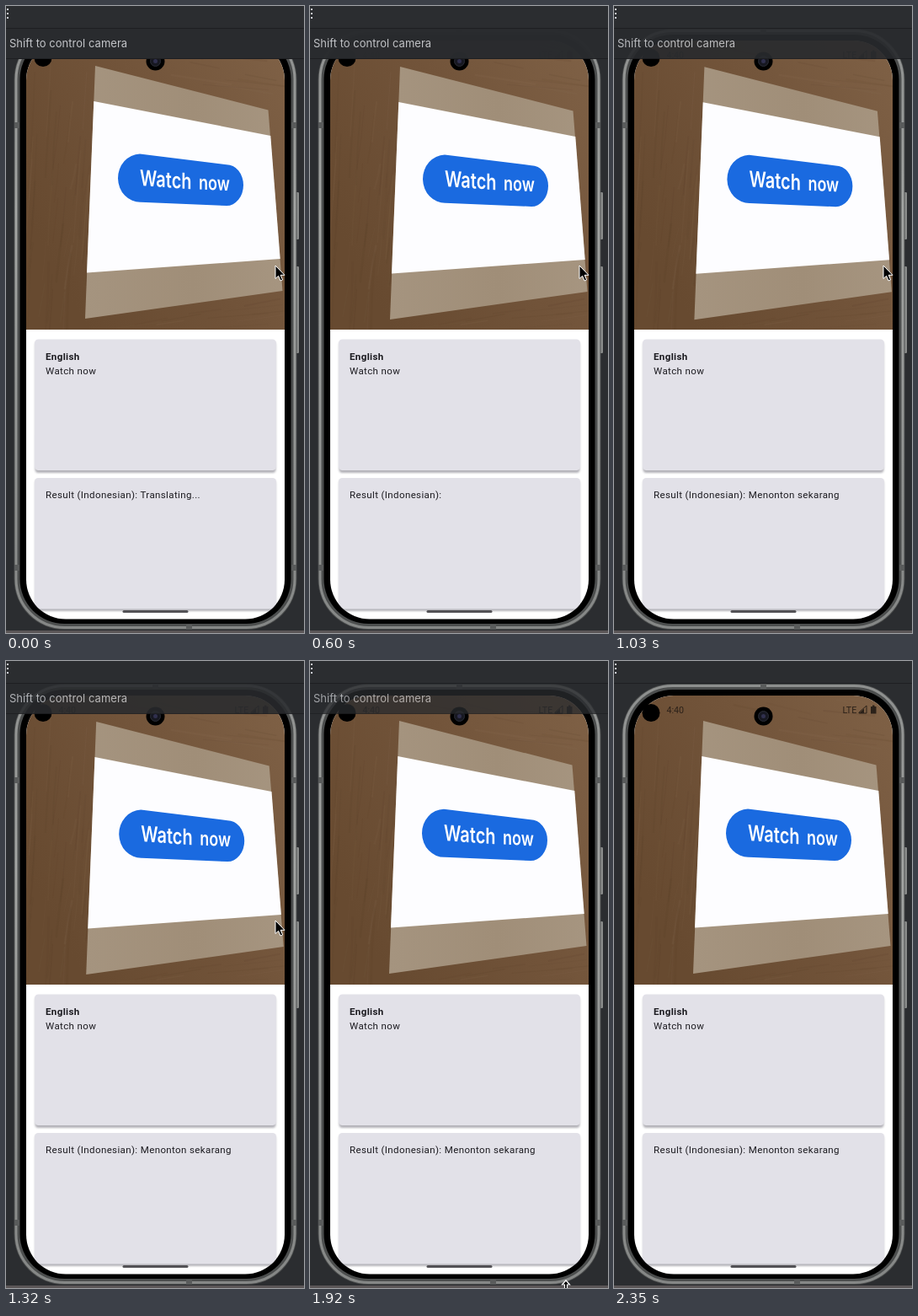
An HTML page for the animation above (2370 ms loop, 354x744 px).

```html
<!DOCTYPE html>
<html lang="en">
<head>
<meta charset="utf-8">
<title>Camera translation</title>
<style>
  html, body { margin: 0; width: 100%; height: 100%; overflow: hidden; background: #2b2d30; }
  svg { display: block; width: 100vw; height: 100vh; }
  .ui { font: 11.56px Roboto, sans-serif; letter-spacing: .36px; fill: #1c1b20; }
  .bold { font-weight: 700; }
  .status { font: 10.7px Roboto, sans-serif; fill: #2b2119; }
  .pill { font-family: Inter, sans-serif; font-weight: 600; fill: #fff; }
  .hint { font: 13px Inter, sans-serif; letter-spacing: .03px; fill: #c3c5c9; }
</style>
</head>
<body>
<svg viewBox="0 0 354 744" preserveAspectRatio="none">
  <defs>
    <linearGradient id="wood" x1="0" y1=".6" x2="1" y2="0">
      <stop offset="0" stop-color="#674a30"/>
      <stop offset=".5" stop-color="#72543a"/>
      <stop offset="1" stop-color="#7f6146"/>
    </linearGradient>
    <linearGradient id="metal" x1="0" y1="0" x2="0" y2="1">
      <stop offset="0" stop-color="#8d8f8e"/>
      <stop offset=".3" stop-color="#a3a5a3"/>
      <stop offset="1" stop-color="#858786"/>
    </linearGradient>
    <linearGradient id="paper" x1="0" y1="0" x2="1" y2="0">
      <stop offset="0" stop-color="#a5947f"/>
      <stop offset=".55" stop-color="#a08e78"/>
      <stop offset="1" stop-color="#a69580"/>
    </linearGradient>
    <filter id="blur" x="-10%" y="-10%" width="120%" height="120%"><feGaussianBlur stdDeviation="1.2"/></filter>
    <clipPath id="screen"><rect x="24" y="41" width="307" height="686.5" rx="47"/></clipPath>
    <clipPath id="view"><rect x="24" y="41" width="307" height="343"/></clipPath>
  </defs>

  <rect width="354" height="744" fill="#2b2d30"/>
  <rect y="26" width="354" height="1" fill="#1e1f22"/>
  <g fill="#ced0d6">
    <rect x="1" y="3" width="2" height="2"/>
    <rect x="1" y="8" width="2" height="2"/>
    <rect x="1" y="13" width="2" height="2"/>
  </g>
  <rect y="741" width="354" height="3" fill="#5b5657"/>

  <g id="phone">
    <g fill="#8b8d8c">
      <rect x="344" y="221" width="4" height="56" rx="1.2"/>
      <rect x="344" y="309" width="4" height="103" rx="1.2"/>
    </g>
    <rect x="9.5" y="27" width="336" height="713" rx="60" fill="#4c4e4e"/>
    <rect x="12" y="29.5" width="331" height="708" rx="57.5" fill="#4c4e4e" stroke="url(#metal)" stroke-width="3"/>
    <rect x="16.500" y="34" width="322" height="699" rx="53"/>
    <g fill="#5a5c5c">
      <rect x="10" y="138" width="6" height="7"/>
      <rect x="339" y="138" width="6" height="7"/>
      <rect x="10" y="663" width="6" height="7"/>
      <rect x="339" y="663" width="6" height="7"/>
      <rect x="174" y="27" width="7" height="6"/>
      <rect x="214" y="734" width="7" height="6"/>
    </g>

    <g clip-path="url(#screen)">
      <rect x="24" y="41" width="307" height="687" fill="#fff"/>
      <g clip-path="url(#view)">
        <rect x="24" y="41" width="307" height="344" fill="url(#wood)"/>
        <g id="grain" fill="none"></g>
        <g id="sheet">
          <path d="M106 71L311.5 123.5L328.5 338L94 371Z" fill="url(#paper)"/>
          <path d="M104.3 113L314.3 154L325.7 300L96 316.5Z" fill="#fdfdff"/>
          <path d="M159 175.6L262 188.2A20 24.4 0 0 1 262 237L160 232.800A26.500 28.600 0 0 1 159 175.600Z" fill="#1a6ae0"/>
          <text class="pill" font-size="20" transform="matrix(1 .07 0 1.3 159 213)">Watch</text>
          <text class="pill" font-size="18" transform="matrix(1 .05 0 1.3 229 217.500)">now</text>
        </g>
      </g>

      <g fill="#8c8b94" opacity=".65" filter="url(#blur)">
        <rect x="34.500" y="398" width="286" height="156" rx="4"/>
        <rect x="34.500" y="562" width="286" height="156" rx="4"/>
      </g>
      <g fill="#e2e1e8">
        <rect x="34" y="395.500" width="287" height="155.500" rx="4.500"/>
        <rect x="34" y="560" width="287" height="155.500" rx="4.500"/>
      </g>
      <text class="ui bold" x="47" y="420">English</text>
      <text class="ui" x="47" y="437">Watch now</text>
      <text class="ui" id="result" x="47" y="584"></text>
      <rect x="138.500" y="717" width="78" height="3" rx="1.500" fill="#535256"/>

      <text class="status" x="62.500" y="62">4:40</text>
      <text class="status" x="271.500" y="62">LTE</text>
      <path d="M291 62V61L300 53V62Z" fill="none" stroke="#2b2119"/>
      <path d="M291 62L297 56.500V62Z" fill="#2b2119"/>
      <path d="M305 54h2v-1.500h2.500V54h2v8.500h-6.500Z" fill="#2b2119"/>
    </g>
    <circle cx="44" cy="61.500" r="10.500"/>
    <circle cx="177.500" cy="65.500" r="11"/>
    <circle cx="177.500" cy="65.500" r="6" fill="#171821" stroke="#2b2d35"/>
    <circle cx="177.500" cy="65.500" r="2.500" fill="#30304d"/>
  </g>

  <g id="banner">
    <rect y="27" width="354" height="35" fill="#292b2e"/>
    <rect y="62" width="354" height="1" fill="#1e1f22"/>
    <text class="hint" x="4" y="49">Shift to control camera</text>
  </g>

  <path id="arrow" d="M0 0V15.500L3.600 12.300L6 18L8.600 16.900L6.200 11.300H11Z" fill="#000" stroke="#fff" stroke-linejoin="round"/>
  <path id="resize" d="M0 0L4.500 5H1.500V12H-1.500V5H-4.500Z" fill="#000" stroke="#fff" stroke-width="1.200" transform="translate(304 735)"/>
</svg>
<script>
  const LOOP = 2370;
  const STEPS = [0, 150, 300, 450, 600, 740, 890, 1030, 1180, 1320, 1470, 1620, 1770, 1920, 2060, 2200, 2350];
  const $ = id => document.getElementById(id);
  const clamp = v => Math.min(1, Math.max(0, v));
  const swell = (t, from, to) => Math.sin(Math.PI * clamp((t - from) / (to - from)));
  const show = (el, on) => el.setAttribute('visibility', on ? 'visible' : 'hidden');
  const move = (el, x, y) => el.setAttribute('transform', `translate(${x} ${y})`);

  let seed = 11;
  const rand = () => (seed = seed * 16807 % 2147483647) / 2147483647;

  function streak(x, y, dx, dy) {
    const p = document.createElementNS('http://www.w3.org/2000/svg', 'path');
    const bend = (rand() - .5) * 4;
    p.setAttribute('d', `M${x} ${y}q${dx / 2 + bend} ${dy / 2} ${dx} ${dy}`);
    p.setAttribute('stroke', rand() < .55 ? '#553c26' : '#8f745a');
    p.setAttribute('stroke-width', .6 + rand() * 2);
    p.setAttribute('opacity', .05 + rand() * .1);
    $('grain').append(p);
  }

  // Upright grain on the left, slanted planks along the top and bottom.
  for (let i = 0; i < 44; i++) streak(24 + rand() * 76, 41 + rand() * 300, -4 - rand() * 5, 30 + rand() * 80);
  for (let i = 0; i < 14; i++) streak(120 + rand() * 180, 42 + rand() * 60, 30 + rand() * 50, 6 + rand() * 8);
  for (let i = 0; i < 12; i++) streak(120 + rand() * 180, 350 + rand() * 34, 30 + rand() * 50, -4 - rand() * 5);

  function resultText(t) {
    const tail = t < 600 ? ' Translating...' : t < 1030 ? '' : ' Menonton sekarang';
    return 'Result (Indonesian):' + tail;
  }

  function render(time) {
    const t = STEPS.findLast(s => s <= time);

    const dx = 1.4 * swell(t, 150, 1900);
    const dy = 1.2 * swell(t, 0, 1950);
    move($('sheet'), dx.toFixed(2), dy.toFixed(2));

    $('result').textContent = resultText(t);

    const fade = clamp((t - 300) / 1900);
    $('banner').setAttribute('opacity', 1 - .28 * fade ** 1.4);
    show($('banner'), t < 2350);

    if (t < 1470) move($('arrow'), 320, 308);
    else if (t < 1620) move($('arrow'), 318, 322);
    else move($('arrow'), 287, 735);
    show($('arrow'), t < 1920);
    show($('resize'), t >= 1920 && t < 2060);
  }

  const start = performance.now();
  function tick() {
    render((performance.now() - start) % LOOP);
    requestAnimationFrame(tick);
  }
  tick();
</script>
</body>
</html>
```
